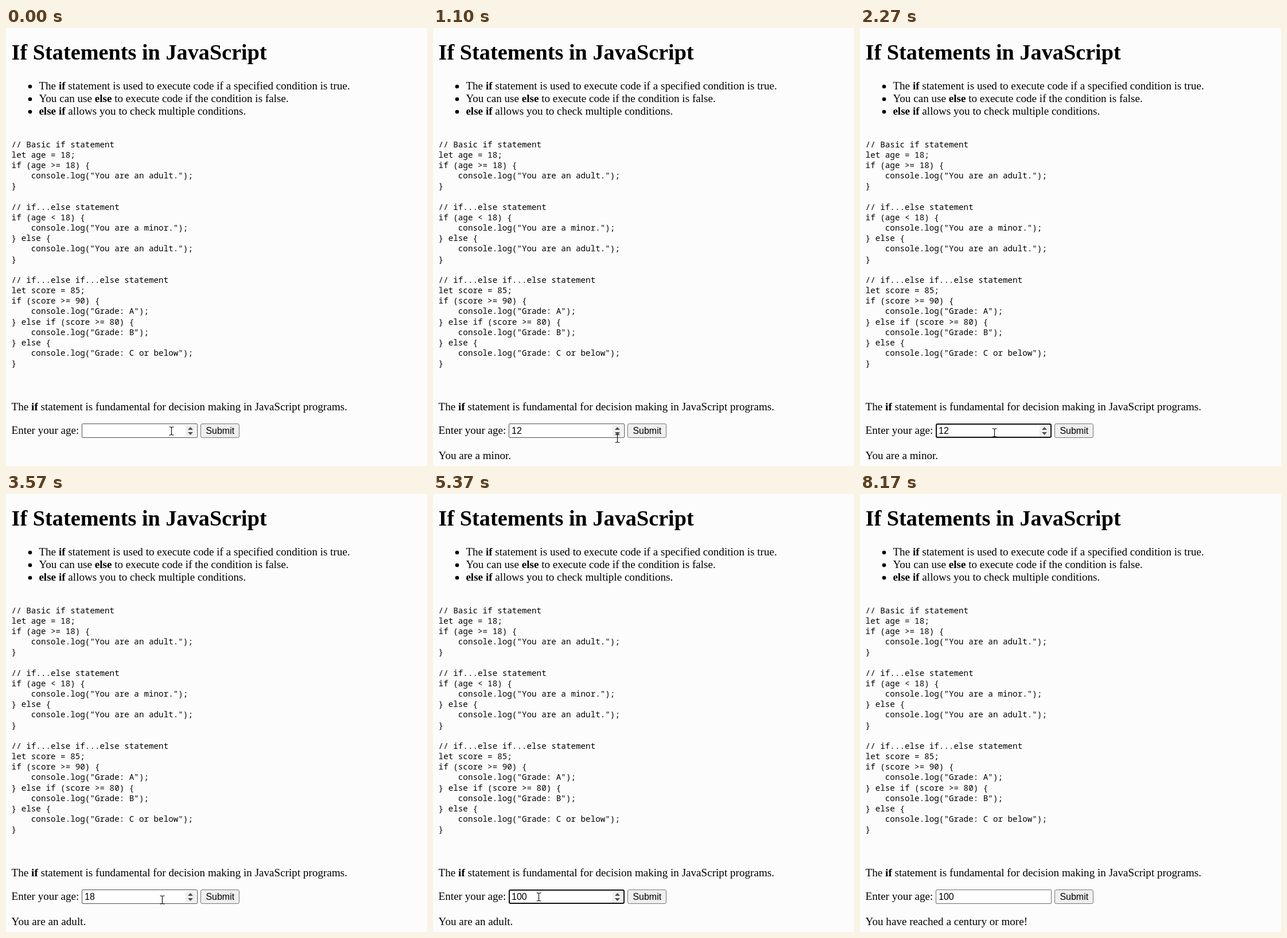
An HTML page that plays this animation: 734 px wide and 763 px high, repeating every 8260 ms.

```html
<!DOCTYPE html>
<html lang="en">
<head>
<meta charset="utf-8">
<title>If Statements in JavaScript</title>
<style>
  html, body { margin: 0; width: 100%; height: 100%; overflow: hidden; background: #fcfcfc; }
  svg { display: block; }
  text { white-space: pre; font: 19.13px "Liberation Serif", serif; }
  .title { font-size: 38.25px; font-weight: bold; }
  .b { font-weight: bold; }
  .code text { font: 500 14.25px "Noto Sans Mono", monospace; }
  .ui { font: 16px "Liberation Sans", sans-serif; }
</style>
</head>
<body>
<svg width="734" height="763" viewBox="0 0 734 763">
  <text class="title" x="9.6" y="55">If Statements in JavaScript</text>
  <g>
    <circle cx="42" cy="102" r="3.3"/>
    <circle cx="42" cy="124" r="3.3"/>
    <circle cx="42" cy="146" r="3.3"/>
    <text x="57.4" y="107">The <tspan class="b">if</tspan> statement is used to execute code if a specified condition is true.</text>
    <text x="57.4" y="129">You can use <tspan class="b">else</tspan> to execute code if the condition is false.</text>
    <text x="57.4" y="151"><tspan class="b">else if</tspan> allows you to check multiple conditions.</text>
  </g>
  <g class="code" id="code"></g>
  <text x="9.6" y="666">The <tspan class="b">if</tspan> statement is fundamental for decision making in JavaScript programs.</text>
  <text x="9.6" y="707">Enter your age:</text>

  <rect id="field" fill="#fff"/>
  <text class="ui" id="value" x="137" y="707"></text>
  <rect id="caret" y="693" width="1.2" height="18"/>
  <g id="spinner">
    <rect x="313" y="692" width="18" height="20" fill="#f0f0f0"/>
    <path d="M317 700l4.5-5 4.5 5zM317 704l4.5 5 4.5-5z" fill="#505050"/>
  </g>

  <rect id="button" x="339.5" y="689.5" width="67" height="24" rx="2.5" stroke="#767676"/>
  <text class="ui" x="373.3" y="707" text-anchor="middle">Submit</text>
  <text id="output" x="9.6" y="751"></text>

  <g id="cursor">
    <path id="beam" d="M-3.5-7H-1L.5-6 2-7H4.5M.5-6V6M-3.5 7H-1L.5 6 2 7H4.5" fill="none" stroke="#000" stroke-width="1.1"/>
    <path id="arrow" d="M0 0V16l3.7-3.5 2.5 5.8 2.4-1-2.5-5.7H11.3Z" fill="#fff" stroke="#000"/>
  </g>
</svg>
<script>
const LOOP = 8260;
const $ = id => document.getElementById(id);

const source = `// Basic if statement
let age = 18;
if (age >= 18) {
    console.log("You are an adult.");
}

// if...else statement
if (age < 18) {
    console.log("You are a minor.");
} else {
    console.log("You are an adult.");
}

// if...else if...else statement
let score = 85;
if (score >= 90) {
    console.log("Grade: A");
} else if (score >= 80) {
    console.log("Grade: B");
} else {
    console.log("Grade: C or below");
}`;

source.split("\n").forEach((line, i) => {
  const text = document.createElementNS("http://www.w3.org/2000/svg", "text");
  text.setAttribute("x", 9.6);
  text.setAttribute("y", Math.floor(208 + 18.185 * i));
  text.textContent = line;
  $("code").append(text);
});

// Each row: time in ms, then the value from that time on.
const values = [[0, ""], [330, "1"], [460, "12"], [2470, "1"], [2630, "18"],
  [4330, "1"], [4600, "10"], [4770, "100"]];
const outputs = [[0, ""], [800, "You are a minor."], [3270, "You are an adult."],
  [6330, "You have reached a century or more!"]];
const focus = [[0, false], [130, true], [800, false], [1800, true], [3270, false],
  [3930, true], [6330, false], [6700, true], [7700, false]];

// Pointer path: time, x, y.
const path = [[0, 288, 702], [130, 284, 702], [500, 284, 702], [730, 372, 702],
  [900, 372, 704], [1100, 321, 715], [1700, 234, 705], [2730, 234, 705],
  [3170, 370, 704], [3330, 370, 704], [3570, 272, 707], [3900, 186, 703],
  [4200, 184, 702], [5800, 184, 702], [6170, 368, 703], [6400, 368, 703],
  [6650, 264, 702], [6950, 264, 702], [7030, 256, 705], [7300, 258, 705],
  [7600, 368, 704], [7850, 368, 704], [8130, 385, 764]];

const lookup = (table, t) => table.findLast(row => row[0] <= t);

function pointer(t) {
  const i = path.findIndex(p => p[0] > t);
  if (i < 0) return path.at(-1).slice(1);
  const [t0, x0, y0] = path[i - 1], [t1, x1, y1] = path[i];
  const k = (t - t0) / (t1 - t0), e = k * k * (3 - 2 * k);
  return [x0 + (x1 - x0) * e, y0 + (y1 - y0) * e];
}

const show = (id, on) => $(id).setAttribute("visibility", on ? "visible" : "hidden");
function set(id, attrs) {
  for (const key in attrs) $(id).setAttribute(key, attrs[key]);
}

function draw(t) {
  const [x, y] = pointer(t);
  const [since, focused] = lookup(focus, t);
  const inRow = y > 688 && y < 717;
  const overField = inRow && x > 131 && x < 335;
  const overButton = inRow && x > 338 && x < 408;

  $("value").textContent = lookup(values, t)[1];
  $("output").textContent = lookup(outputs, t)[1];

  set("field", focused
    ? { x: 133, y: 690, width: 200, height: 23, rx: 2, stroke: "#101010", "stroke-width": 2 }
    : { x: 132.5, y: 689.5, width: 201, height: 24, rx: 1.5, stroke: overField ? "#505050" : "#6c6c6c", "stroke-width": 1 });
  set("button", { fill: overButton ? "#e5e5e5" : "#efefef" });
  set("caret", { x: 136.6 + $("value").textContent.length * 8.9 });
  set("cursor", { transform: `translate(${Math.round(x)} ${Math.round(y)})` });

  const typedAt = lookup(values, t)[0];
  show("caret", focused && (t - Math.max(since, typedAt)) % 800 < 400);
  show("spinner", focused || overField);
  show("beam", overField);
  show("arrow", !overField && t < 8130);
}

const start = performance.now();
function tick() {
  draw((performance.now() - start) % LOOP);
  requestAnimationFrame(tick);
}
draw(0);
tick();
</script>
</body>
</html>
```
